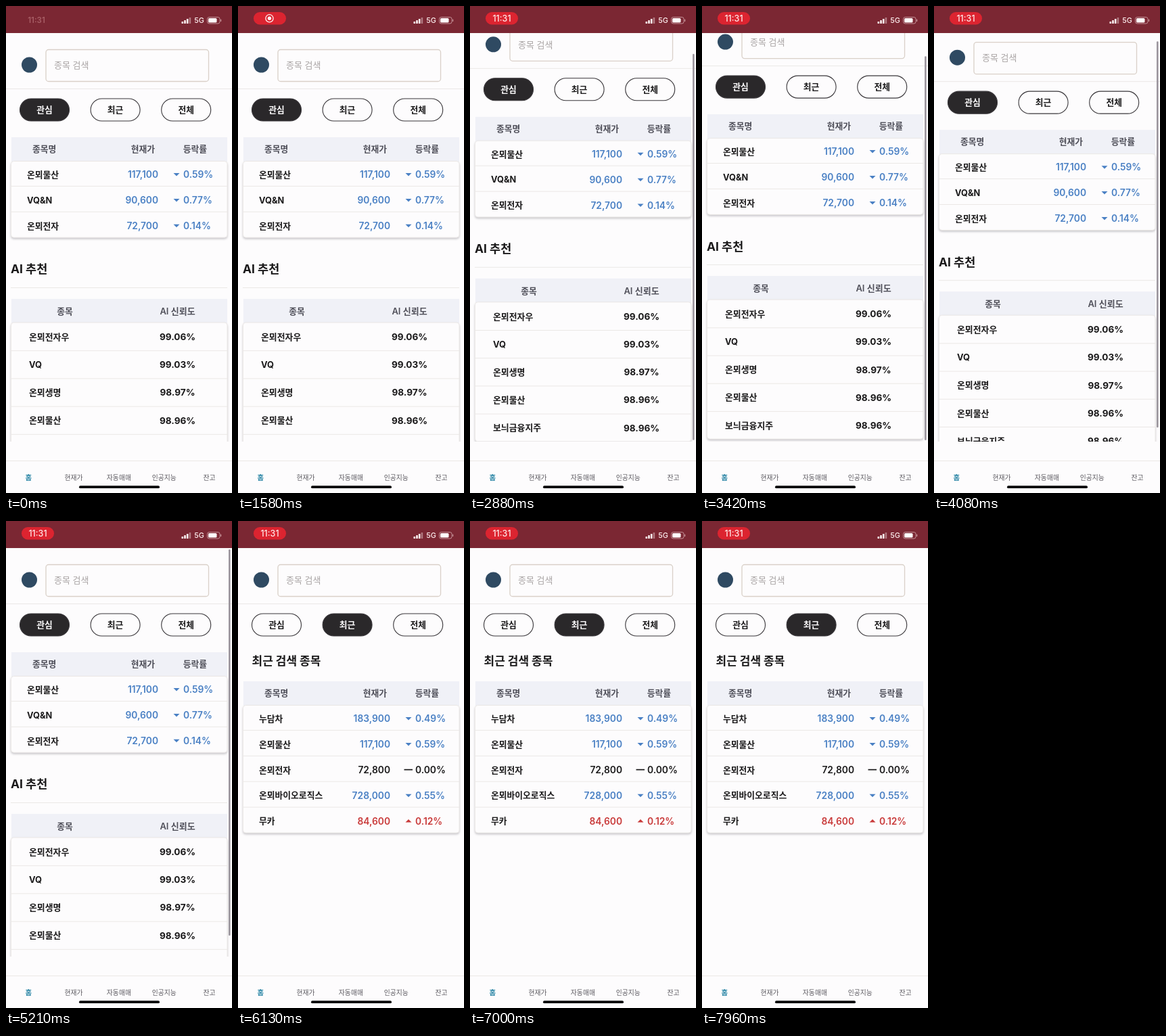
Recreate the animation shown at these times as an HTML page. Size 334x720 px, loop 8 s.

```html
<!DOCTYPE html>
<html lang="ko">
<head>
<meta charset="utf-8">
<style>
  html, body { margin: 0; width: 100%; height: 100%; overflow: hidden; background: #fdfcfd; }
  svg { display: block; width: 100vw; height: 100vh; }
  text { font-family: Inter, "Noto Sans CJK KR", "Noto Sans CJK JP", sans-serif; }
  .card { filter: drop-shadow(0 2px 1.5px rgba(90, 85, 95, .3)); }
</style>
</head>
<body>
<svg id="stage" viewBox="0 0 334 720">
  <clipPath id="viewport"><rect y="40" width="334" height="604"/></clipPath>
</svg>
<script>
const LOOP = 8000, TAB_SWITCH = 6100;
const PAPER = '#fdfcfd', INK = '#1b1a1b', GREY = '#50505a', BLUE = '#4a80c4', RED = '#c93a3a';
const LINE = '#ebe8e6', HEAD = '#f0f1f7', OUTLINE = '#39363a', BAR = '#7b2733';
const stage = document.getElementById('stage');

function add(parent, tag, attrs, content) {
  const node = document.createElementNS('http://www.w3.org/2000/svg', tag);
  for (const key in attrs) node.setAttribute(key, attrs[key]);
  if (content) node.textContent = content;
  return parent.appendChild(node);
}
const group = (parent, attrs) => add(parent, 'g', attrs);
const rect = (parent, x, y, width, height, fill, more) =>
  add(parent, 'rect', { x, y, width, height, fill, ...more });
const rule = (parent, x, y, width) => rect(parent, x, y, width, 1, LINE);

// y is the optical middle of the line
function label(parent, content, x, y, size, weight, fill, anchor = 'start') {
  return add(parent, 'text', {
    x, y: y + size * .37, fill, 'font-size': size, 'font-weight': weight, 'text-anchor': anchor
  }, content);
}

function card(parent, y, height) {
  rect(parent, 7.5, y, 319.5, height, PAPER, { rx: 4, stroke: LINE, class: 'card' });
}

function tableHead(parent, y, height) {
  rect(parent, 8, y, 319, height, HEAD);
}

function priceTable(parent, top, rows) {
  tableHead(parent, top, 36);
  label(parent, '종목명', 39, top + 17, 12.8, 600, GREY);
  label(parent, '현재가', 220, top + 17, 12.8, 600, GREY, 'end');
  label(parent, '등락률', 297, top + 17, 12.8, 600, GREY, 'end');
  card(parent, top + 35.5, rows.length * 37.9 - 1);
  rows.forEach(([name, price, rate, trend], i) => {
    const y = top + 55 + i * 37.9;
    const color = trend < 0 ? BLUE : trend > 0 ? RED : INK;
    if (i) rule(parent, 8, y - 21, 319);
    label(parent, name, 31, y, 12.8, 700, INK);
    label(parent, price, 225, y, 13.8, 600, color, 'end');
    label(parent, rate, 262, y, 13.8, 600, color);
    if (trend) {
      add(parent, 'path', { d: `M247.5 ${y + trend * 2}h9l-4.5 ${-trend * 4.5}z`, fill: color });
    } else {
      rect(parent, 245.5, y - 1, 12.5, 1.7, color);
    }
  });
}

rect(stage, 0, 0, 334, 720, PAPER);

const view = group(stage, { 'clip-path': 'url(#viewport)' });
const page = group(view);

// search header
add(page, 'circle', { cx: 34.5, cy: 87, r: 11.5, fill: '#2f4a62' });
rect(page, 59, 64.5, 240.5, 47, PAPER, { rx: 4, stroke: '#d9d0c8', 'stroke-width': 1.3 });
label(page, '종목 검색', 71, 87, 13, 400, '#a9a4a4');
rule(page, 0, 122, 334);

// tab buttons
const tabs = ['관심', '최근', '전체'].map((name, i) => {
  const x = 20.5 + i * 104.6;
  return {
    box: rect(page, x, 137, 73, 33, PAPER, { rx: 16.5, stroke: OUTLINE, 'stroke-width': 1.1 }),
    text: label(page, name, x + 36.5, 153.5, 12.8, 700, INK, 'middle')
  };
});

// favourites
const favourites = group(page);
priceTable(favourites, 194, [
  ['온뫼물산', '117,100', '0.59%', -1],
  ['VQ&N', '90,600', '0.77%', -1],
  ['온뫼전자', '72,700', '0.14%', -1]
]);
label(favourites, 'AI 추천', 7, 389, 17.5, 700, INK);
rule(favourites, 7, 416, 320);
tableHead(favourites, 433, 36);
label(favourites, '종목', 87, 451, 12.8, 600, GREY, 'middle');
label(favourites, 'AI 신뢰도', 253.5, 451, 13, 600, GREY, 'middle');
card(favourites, 468, 206);
[['온뫼전자우', '99.06%'], ['VQ', '99.03%'], ['온뫼생명', '98.97%'],
 ['온뫼물산', '98.96%'], ['보늬금융지주', '98.96%']].forEach(([name, trust], i) => {
  const y = 489 + i * 41.2;
  if (i) rule(favourites, 8, y - 21, 319);
  label(favourites, name, 34, y, 12.9, 700, INK);
  label(favourites, trust, 253.5, y, 13.6, 700, INK, 'middle');
});

// recent searches
const recent = group(page);
label(recent, '최근 검색 종목', 20.5, 206.5, 17, 700, INK);
priceTable(recent, 237, [
  ['누담차', '183,900', '0.49%', -1],
  ['온뫼물산', '117,100', '0.59%', -1],
  ['온뫼전자', '72,800', '0.00%', 0],
  ['온뫼바이오로직스', '728,000', '0.55%', -1],
  ['무카', '84,600', '0.12%', 1]
]);

const thumb = rect(stage, 329, 42, 2.6, 570, '#9a949c', { rx: 1.3 });

// bottom navigation
rule(stage, 0, 672, 334);
['홈', '현재가', '자동매매', '인공지능', '잔고'].forEach((name, i) =>
  label(stage, name, 33.3 + i * 66.8, 697, i ? 9.8 : 10.5, i ? 400 : 600, i ? '#5c5a60' : '#3189a8', 'middle'));
rect(stage, 108, 709.3, 119, 3.8, '#050506', { rx: 1.9 });

// status bar
rect(stage, 0, 0, 334, 40, BAR);
const plainClock = label(stage, '11:31', 45, 21, 11.5, 600, '#f0b8b8', 'middle');
const pill = group(stage);
rect(pill, 23, 9, 48, 18.5, '#dc2430', { rx: 9.25 });
const recordIcon = group(pill);
add(recordIcon, 'circle', { cx: 46.5, cy: 18.3, r: 5.6, fill: 'none', stroke: '#fff0f0', 'stroke-width': 1.3 });
add(recordIcon, 'circle', { cx: 46.5, cy: 18.3, r: 2.7, fill: '#fff0f0' });
const pillClock = label(pill, '11:31', 47, 18.3, 12.5, 500, '#ffe8e8', 'middle');
[3, 5, 7, 9].forEach((h, i) =>
  rect(stage, 259.5 + i * 3.7, 26 - h, 2.6, h, '#fff6f6', { rx: .6, opacity: i < 3 ? 1 : .4 }));
label(stage, '5G', 285.5, 21.5, 10.8, 500, '#fff0f0', 'middle');
rect(stage, 297.5, 16.5, 18.5, 9.5, 'none', { rx: 2.8, stroke: '#c59298' });
rect(stage, 299, 18, 12.5, 6.5, '#fffcfc', { rx: 1.6 });
rect(stage, 317, 19.5, 1.2, 3.5, '#c59298', { rx: .6 });

const ramp = (t, from, to) => Math.min(1, Math.max(0, (t - from) / (to - from)));
const smooth = p => p * p * (3 - 2 * p);

// scroll offset: drag down past the end, settle, flick back past the top, settle
const scrollKeys = [[2500, 0], [3050, 39], [3580, 32.5], [3900, 32.5], [4300, -18], [4690, 0]];
function scrollAt(t) {
  let value = 0;
  for (let i = 1; i < scrollKeys.length; i++) {
    const [t0, v0] = scrollKeys[i - 1], [t1, v1] = scrollKeys[i];
    value += (v1 - v0) * smooth(ramp(t, t0, t1));
  }
  return value;
}

function render(t) {
  const offset = scrollAt(t), isRecent = t >= TAB_SWITCH;
  page.setAttribute('transform', `translate(0 ${-offset})`);
  favourites.setAttribute('visibility', isRecent ? 'hidden' : 'visible');
  recent.setAttribute('visibility', isRecent ? 'visible' : 'hidden');
  tabs.forEach(({ box, text }, i) => {
    const active = i === +isRecent;
    box.setAttribute('fill', active ? '#2a282a' : PAPER);
    text.setAttribute('fill', active ? '#fdfcfd' : INK);
  });

  // the thumb shortens when pulled past either end
  const top = 42 + Math.max(0, offset) * .95;
  const bottom = Math.min(642, 613 + offset * .95);
  thumb.setAttribute('y', top);
  thumb.setAttribute('height', bottom - top);
  thumb.setAttribute('opacity', ramp(t, 2500, 2650) * (1 - ramp(t, 5300, 5600)));

  const swap = smooth(ramp(t, 2500, 2800));
  plainClock.setAttribute('opacity', .38 * (1 - ramp(t, 0, 160)));
  pill.setAttribute('opacity', smooth(ramp(t, 100, 450)));
  recordIcon.setAttribute('opacity', 1 - swap);
  pillClock.setAttribute('opacity', swap);
}

const start = performance.now();
function tick() {
  render((performance.now() - start) % LOOP);
  requestAnimationFrame(tick);
}
tick();
</script>
</body>
</html>
```
